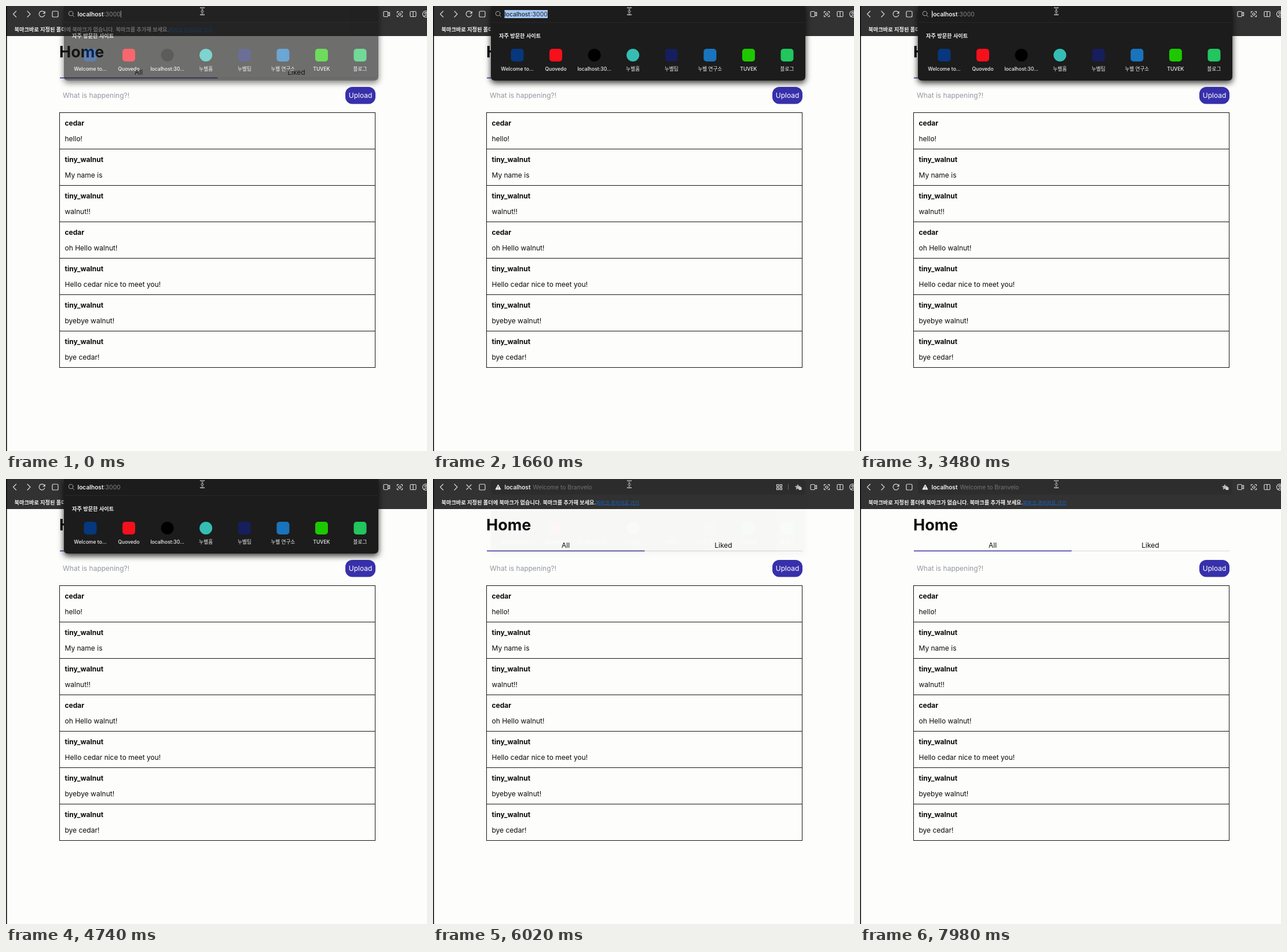
An HTML page that plays this animation: 727 by 770 pixels, repeating every 8000 ms.

```html
<!DOCTYPE html>
<html lang="ko">
<head>
<meta charset="utf-8">
<title>Home</title>
<style>
html, body { margin: 0; width: 100%; height: 100%; overflow: hidden; background: #fdfdfb; }
svg { display: block; width: 727px; height: 770px; }
text { font-family: Inter, "Noto Sans CJK KR", "Noto Sans CJK", sans-serif; font-size: 12px; fill: #0a0a0a; white-space: pre; }
.bold { font-weight: 700; }
.mid { text-anchor: middle; }
.ui { font-size: 10.2px; fill: #f2f2f2; font-weight: 500; }
.ko { font-size: 9.2px; fill: #f2f2f2; font-weight: 600; }
.site { font-size: 8.6px; fill: #f2f2f2; font-weight: 500; text-anchor: middle; }
.line { fill: none; stroke: #dadada; stroke-width: 1.2; stroke-linecap: round; stroke-linejoin: round; }

/* hard switches hold each value until the next key */
.switch { animation: 8s step-end infinite; }
.panel { animation: panel 8s linear infinite; }
.focus { animation-name: focus; }
.idle { animation-name: idle; }
.plain { animation-name: plain; }
.picked { animation-name: picked; }
.end-caret { animation-name: endCaret; }
.start-caret { animation-name: startCaret; }
.extras { animation: extras 8s linear infinite; }
.stop { animation: stop 8s linear infinite; }
.reload { animation: reload 8s linear infinite; }

@keyframes panel {
  0% { opacity: .63; }
  1.5%, 73.4% { opacity: 1; }
  75.3%, 100% { opacity: 0; }
}
@keyframes focus { 0% { opacity: 1; } 73.5%, 100% { opacity: 0; } }
@keyframes idle { 0% { opacity: 0; } 73.5%, 100% { opacity: 1; } }
@keyframes plain { 0% { opacity: 1; } .75% { opacity: 0; } 38%, 100% { opacity: 1; } }
@keyframes picked { 0% { opacity: 0; } .75% { opacity: 1; } 38%, 100% { opacity: 0; } }
@keyframes endCaret { 0% { opacity: 1; } .75%, 100% { opacity: 0; } }
@keyframes startCaret {
  0%, 44.25%, 56.75%, 69.25%, 100% { opacity: 0; }
  38%, 50.5%, 63% { opacity: 1; }
}
@keyframes extras { 0%, 77% { opacity: 1; } 78.5%, 100% { opacity: 0; } }
@keyframes stop { 0%, 73.5% { opacity: 0; } 73.51%, 93% { opacity: 1; } 94.75%, 100% { opacity: 0; } }
@keyframes reload { 0%, 73.5% { opacity: 1; } 73.51%, 93% { opacity: 0; } 94.75%, 100% { opacity: 1; } }
</style>
</head>
<body>
<svg viewBox="0 0 727 770">
  <defs>
    <filter id="shadow" x="-10%" y="-20%" width="120%" height="150%">
      <feDropShadow dx="0" dy="4" stdDeviation="5.5" flood-color="#000" flood-opacity=".8"/>
    </filter>
    <path id="beam" d="M336 3 Q339 3 339 5 V13 Q339 15 336 15 M342 3 Q339 3 339 5 M339 13 Q339 15 342 15 M337.5 9.5 H340.5"/>
  </defs>
  <rect width="727" height="770" fill="#fdfdfb"/>

  <!-- page -->
  <text class="bold" x="92" y="89" style="font-size:27px">Home</text>
  <text class="mid" x="229" y="119">All</text>
  <text class="mid" x="501.5" y="119">Liked</text>
  <rect x="93" y="124" width="545" height="1" fill="#d6d6dc"/>
  <rect x="93" y="123.7" width="272.5" height="1.5" fill="#3730a3"/>
  <text x="98" y="159" style="fill:#9398a3">What is happening?!</text>
  <rect x="586" y="140" width="52" height="29.5" rx="12" fill="#3730ab"/>
  <text class="mid" x="612" y="159" style="fill:#fff">Upload</text>
  <g id="posts"></g>

  <!-- toolbar -->
  <rect width="727" height="52" fill="#323232"/>
  <rect x="100" y="1" width="543" height="26" rx="6" fill="#2d2d2d"/>
  <rect width="1.6" height="770" fill="#0c0c0c"/>
  <g class="line">
    <path d="M17.5 9 L12.5 14 L17.5 19 M37 9 L42 14 L37 19"/>
    <path class="reload" d="M66.6 11.6 A5 5 0 1 0 66.8 15.6 M67.2 9.6 V12.6 H64.2"/>
    <path class="stop" d="M58 10 L66 18 M66 10 L58 18"/>
    <rect x="80" y="9" width="10" height="10" rx="2"/>
    <rect x="652" y="9.5" width="7.5" height="9" rx="1.5"/>
    <path d="M659.5 12.8 L662.5 11 V17 L659.5 15.2"/>
    <path d="M675.5 12 V9.5 H678 M682 9.5 H684.5 V12 M684.5 16 V18.5 H682 M678 18.5 H675.5 V16"/>
    <circle cx="680" cy="14" r="2"/>
    <rect x="698" y="9.5" width="10" height="9" rx="1.5"/>
    <path d="M703 9.5 V18.5"/>
    <circle cx="725" cy="14" r="5.5"/>
    <circle cx="725" cy="12.4" r="1.8"/>
    <path d="M721.5 18 Q725 14.5 728 18"/>
  </g>
  <text class="ko" x="14.5" y="43.5">북마크바로 지정된 폴더에 북마크가 없습니다. 북마크를 추가해 보세요.</text>
  <text class="ko" x="281" y="43.5" style="font-size:8.5px;font-weight:400;fill:#1c63c4;text-decoration:underline">북마크 관리자로 가기</text>

  <g class="switch idle">
    <path d="M112.5 9.8 L117 18 H108 Z" fill="#f2f2f2" stroke="#f2f2f2" stroke-linejoin="round"/>
    <path d="M112.5 12.5 V15 M112.5 16.3 V17.2" stroke="#2d2d2d"/>
    <text class="ui" x="123.5" y="17.5" style="font-weight:600">localhost</text>
    <text class="ui" x="172.5" y="17.5" style="fill:#747474;font-weight:400">Welcome to Branvelo</text>
    <path d="M630 8.8 L631.6 12 L635.2 12.5 L632.6 15 L633.2 18.5 L630 16.8 L626.8 18.5 L627.4 15 L624.8 12.5 L628.4 12 Z" fill="#b8b8b8"/>
    <rect x="631.5" y="14" width="5" height="5" rx="1" fill="#d0d0d0"/>
    <g class="extras">
      <path class="line" d="M593.5 9.5 h3.4 v3.4 h-3.4 z M599.1 9.5 h3.4 v3.4 h-3.4 z M593.5 15.1 h3.4 v3.4 h-3.4 z M599.1 15.1 h3.4 v3.4 h-3.4 z"/>
      <path d="M613.5 9 V19" stroke="#666"/>
    </g>
  </g>

  <!-- suggestions -->
  <g class="panel">
    <path d="M100 0 H643 V122 Q643 129 636 129 H107 Q100 129 100 122 Z" fill="#1d1d1d" filter="url(#shadow)"/>
    <path d="M101 28.5 H642" stroke="#282828"/>
    <text class="ko" x="114" y="54.5">자주 방문한 사이트</text>
    <g id="sites"></g>
  </g>
  <g class="switch focus">
    <g class="line" style="stroke:#a8a8a8;stroke-width:1">
      <circle cx="112" cy="13" r="3.8"/>
      <path d="M115 16 L117.5 18.5"/>
    </g>
    <g class="switch plain">
      <text class="ui" x="123.5" y="17.5" style="font-weight:600">localhost</text>
      <text class="ui" x="168.5" y="17.5" style="fill:#858585;font-weight:400;font-size:10.5px">:3000</text>
    </g>
    <g class="switch picked">
      <rect x="123.5" y="7" width="74.5" height="14" fill="#a5c8f4"/>
      <text class="ui" x="123.5" y="17.5" style="fill:#20252d">localhost</text>
      <text class="ui" x="168.5" y="17.5" style="fill:#20252d;font-weight:400;font-size:10.5px">:3000</text>
    </g>
    <rect class="switch end-caret" x="198" y="8" width="1" height="12" fill="#999"/>
    <rect class="switch start-caret" x="124" y="8" width="1" height="12" fill="#eee"/>
  </g>

  <!-- pointer -->
  <g fill="none" stroke-linecap="round">
    <use href="#beam" stroke="#e8e8e8" stroke-width="2.2"/>
    <use href="#beam" stroke="#1a1a1a" stroke-width=".9"/>
  </g>
</svg>
<script>
const posts = [
  ["cedar", "hello!"],
  ["tiny_walnut", "My name is"],
  ["tiny_walnut", "walnut!!"],
  ["cedar", "oh Hello walnut!"],
  ["tiny_walnut", "Hello cedar nice to meet you!"],
  ["tiny_walnut", "byebye walnut!"],
  ["tiny_walnut", "bye cedar!"]
];
const sites = [
  ["Welcome to...", "#07377d", 5],
  ["Quovedo", "#f5101c", 5],
  ["localhost:30...", "#000", 11],
  ["누벨홈", "#35bdb4", 11],
  ["누벨팀", "#171e5c", 5],
  ["누벨 연구소", "#1974bd", 5],
  ["TUVEK", "#1ec800", 5],
  ["블로그", "#22c55e", 5]
];
const fill = (id, list, draw) => {
  document.getElementById(id).innerHTML = list.map(draw).join("");
};

fill("posts", posts, ([user, body], i) => {
  const y = 184.5 + 63 * i;
  return `<rect x="92.5" y="${y}" width="545" height="63" fill="none" stroke="#151515"/>
    <text class="bold" x="101.5" y="${y + 22.5}">${user}</text>
    <text x="101.5" y="${y + 49.5}">${body}</text>`;
});

fill("sites", sites, ([name, color, round], i) => {
  const x = 145.5 + 66.57 * i;
  return `<rect x="${x - 11}" y="74" width="22" height="22" rx="${round}" fill="${color}"/>
    <text class="site" x="${x}" y="112">${name}</text>`;
});
</script>
</body>
</html>
```
